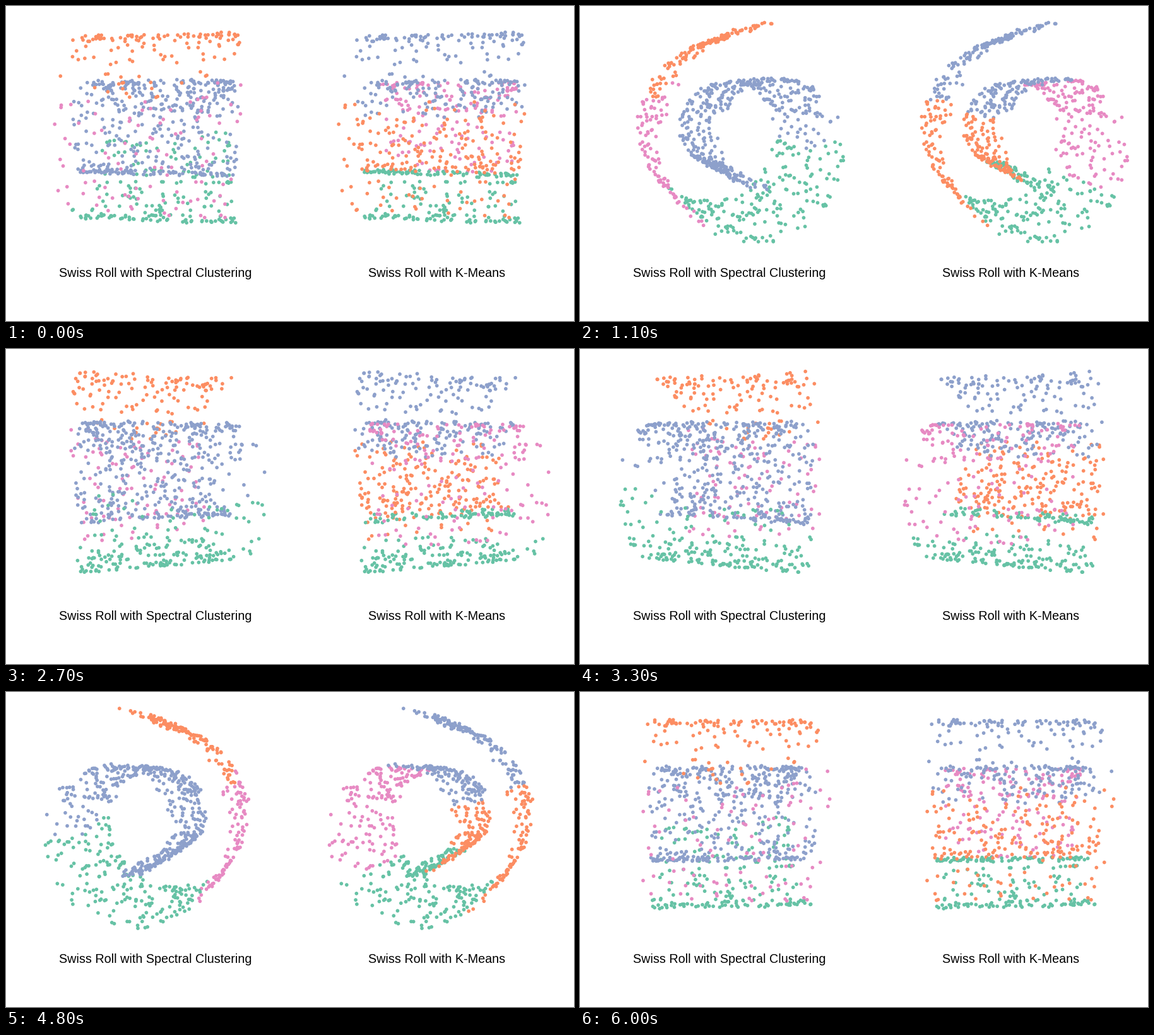
Recreate the animation shown at these times as a matplotlib script. Size 900x500 px, loop 6.1 s.

```python
import numpy as np
import matplotlib.pyplot as plt
from matplotlib.animation import FuncAnimation

plt.rcParams["font.family"] = "Liberation Sans"

W, H, DPI = 900, 500, 100
FRAMES, INTERVAL = 61, 100
GREEN, ORANGE, BLUE, PINK = "#66c2a5", "#fc8d62", "#8da0cb", "#e78ac3"

# Camera: angles in degrees, lengths in data units, focal length in pixels
START, STEP, TILT = 7.5, 5.82, 4.5
DISTANCE, FOCAL = 60, 711
CENTER = np.array([1.56, 10.5, 1.55])
Z_SCALE = 0.985
SCREEN_X, SCREEN_Y, PANEL = 239, 193, 450
DOT = 5.7


def swiss_roll(rng):
    """Slightly noisy roll, a little denser along its two free edges."""
    u = np.concatenate([
        rng.uniform(0, 1, 820),
        rng.uniform(0.97, 1, 25),
        rng.uniform(0, 0.06, 20),
    ])
    t = 1.5 * np.pi * (1 + 2 * u)
    y = 21 * rng.uniform(0, 1, len(t))
    points = np.column_stack([t * np.cos(t), y, t * np.sin(t)])
    points[:, [0, 2]] += rng.normal(0, 0.12, (len(t), 2))
    return t, points


def spectral_colors(t, y):
    """Clusters follow the roll; the borders bend a little across its width."""
    q = (y - 10.5) / 10.5
    borders = [
        9.6 - 0.12 * q - 0.28 * q**2,
        11.7 - 0.1 * q,
        13.0 + 0.12 * q + 0.33 * q**2,
    ]
    label = sum((t > b).astype(int) for b in borders)
    return np.array([BLUE, GREEN, PINK, ORANGE])[label]


def kmeans_colors(points):
    """Nearest cluster mean in the plane of the spiral."""
    means = np.array([[4.5, 7.7], [7.8, -1.3], [-7.5, 2.5], [0.3, -9]])
    gaps = np.linalg.norm(points[:, None, [0, 2]] - means, axis=2)
    return np.array([BLUE, ORANGE, PINK, GREEN])[gaps.argmin(axis=1)]


def project(points, azimuth):
    """Screen positions and nearness for a camera circling the roll."""
    x, y, z = (points - CENTER).T
    z = z * Z_SCALE
    a, e = np.radians(azimuth), np.radians(TILT)
    right = y * np.cos(a) - x * np.sin(a)
    toward = x * np.cos(a) + y * np.sin(a)
    up = z * np.cos(e) - toward * np.sin(e)
    near = toward * np.cos(e) + z * np.sin(e)
    scale = FOCAL / (DISTANCE - near)
    return np.column_stack([SCREEN_X + scale * right, SCREEN_Y - scale * up]), near


t, roll = swiss_roll(np.random.RandomState(0))
palettes = [spectral_colors(t, roll[:, 1]), kmeans_colors(roll)]

fig = plt.figure(figsize=(W / DPI, H / DPI), dpi=DPI, facecolor="white")
ax = fig.add_axes([0, 0, 1, 1])
ax.set_xlim(0, W)
ax.set_ylim(H, 0)
ax.axis("off")

for x, title in [(84.5, "Swiss Roll with Spectral Clustering"),
                 (574.5, "Swiss Roll with K-Means")]:
    ax.text(x, 430, title, fontsize=19.8 * 72 / DPI, color="black",
            ha="left", va="baseline")

clouds = [ax.scatter(roll[:, 0], roll[:, 1], s=(DOT * 72 / DPI) ** 2, c=p, linewidths=0)
          for p in palettes]


def draw(frame):
    spots, near = project(roll, START + STEP * frame)
    order = near.argsort()
    for i, (cloud, colors) in enumerate(zip(clouds, palettes)):
        cloud.set_offsets(spots[order] + [PANEL * i, 0])
        cloud.set_facecolor(colors[order])
    return clouds


anim = FuncAnimation(fig, draw, frames=FRAMES, interval=INTERVAL,
                     repeat=True, repeat_delay=0)
plt.show()
```
